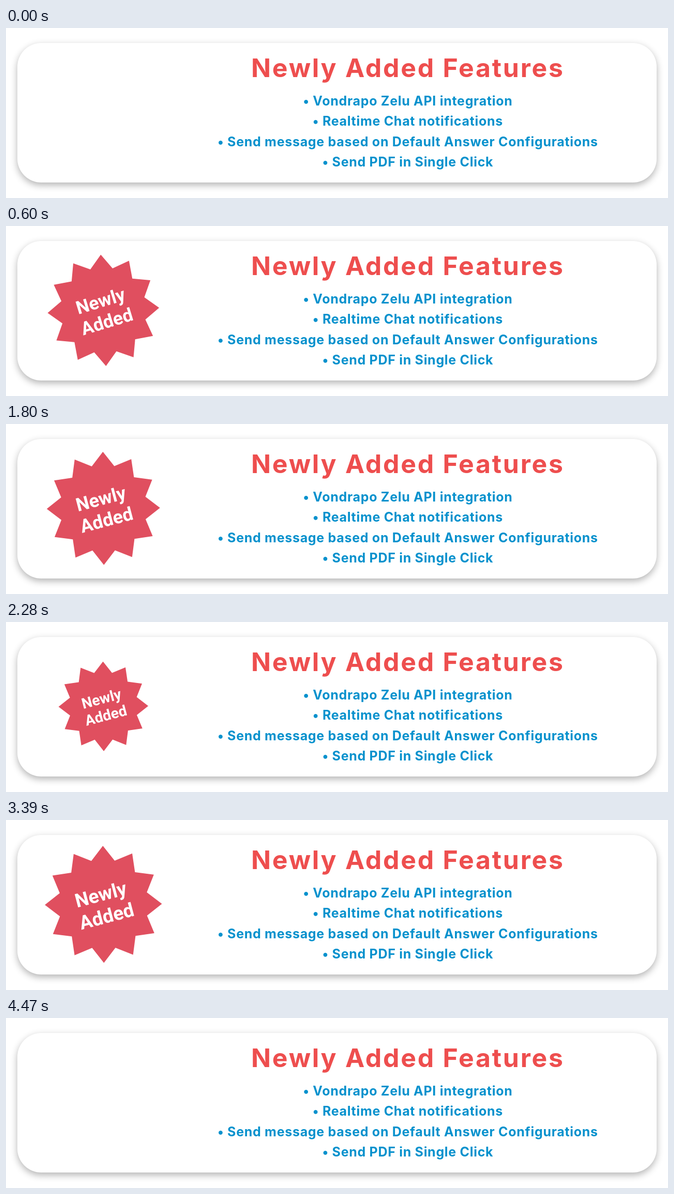
Animation of 1280 by 329 pixels, one loop 4500 ms. Source, as an HTML page with a canvas:

```html
<!DOCTYPE html>
<html lang="en">
<head>
<title>Newly Added Features</title>
<style>
  html, body { margin: 0; width: 100%; height: 100%; overflow: hidden; background: #fff; }
  canvas { display: block; width: 100vw; height: 100vh; }
</style>
</head>
<body>
<canvas id="stage" width="1280" height="329"></canvas>
<script>
const ctx = document.getElementById('stage').getContext('2d');
const LOOP = 4500, STEP = 30;
const TAU = Math.PI * 2, RAD = Math.PI / 180;
const CENTER = { x: 188.3, y: 163.2 };
const REST = 107, LOW = 86.5, HIGH = 113.8;
const PULSE = { start: 1165, half: 365 };
const EXIT = { start: 4040, end: 4470 };

const BULLETS = [
  'Vondrapo Zelu API integration',
  'Realtime Chat notifications',
  'Send message based on Default Answer Configurations',
  'Send PDF in Single Click'
];

const clamp = v => Math.min(1, Math.max(0, v));
const mix = (a, b, k) => a + (b - a) * k;
const easeSine = u => (1 - Math.cos(Math.PI * clamp(u))) / 2;

function easeBack(u, c = 1.25) {
  const v = clamp(u) - 1;
  return 1 + (c + 1) * v ** 3 + c * v * v;
}

// Radius before the exit: pop in, then breathe between LOW and HIGH.
function pulseRadius(t) {
  if (t < PULSE.start) return REST * easeBack(t / 660);
  const n = (t - PULSE.start) / PULSE.half;
  if (n < 1) return mix(REST, LOW, easeSine(n));
  return mix(LOW, HIGH, (1 + Math.cos(Math.PI * n)) / 2);
}

function badgePose(t) {
  const out = easeSine((t - EXIT.start) / (EXIT.end - EXIT.start));
  const turn = -0.5 - 34 * (1 - clamp(t / 1000)) ** 3;
  return {
    x: CENTER.x + 6 * out,
    y: CENTER.y + 1.5 * out,
    r: pulseRadius(t) * (1 - out),
    turn: turn * RAD
  };
}

function write(text, x, y, size, spacing, color) {
  ctx.font = `700 ${size}px Inter, "Open Sans", sans-serif`;
  ctx.letterSpacing = spacing + 'px';
  ctx.fillStyle = color;
  ctx.fillText(text, x + spacing / 2, y);
}

function drawCard() {
  ctx.fillStyle = '#fff';
  ctx.fillRect(0, 0, 1280, 329);
  ctx.save();
  ctx.shadowColor = 'rgba(0,0,0,.3)';
  ctx.shadowBlur = 14;
  ctx.shadowOffsetY = 5;
  ctx.beginPath();
  ctx.roundRect(22, 29, 1236, 270, 46);
  ctx.fill();
  ctx.restore();

  ctx.textAlign = 'center';
  write('Newly Added Features', 775.5, 95, 50, 2.7, '#ee4e4e');
  BULLETS.forEach((line, i) =>
    write('\u2022 ' + line, 776.5, 149.5 + i * 39.5, 25, 0.7, '#0591cd'));
}

function drawBadge({ x, y, r, turn }) {
  if (r < 0.3) return;
  ctx.save();
  ctx.translate(x, y);
  ctx.rotate(turn);
  ctx.scale(r / 100, r / 100);

  ctx.beginPath();
  for (let i = 0; i < 24; i++) {
    const a = i * TAU / 24, d = i % 2 ? 77 : 100;
    ctx.lineTo(d * Math.sin(a), -d * Math.cos(a));
  }
  ctx.closePath();
  ctx.fillStyle = '#e04f5f';
  ctx.fill();

  ctx.rotate(-14.3 * RAD);
  ctx.font = '700 32.8px Roboto, sans-serif';
  ctx.letterSpacing = '0px';
  ctx.fillStyle = '#fff';
  ctx.fillText('Newly', 0, -6);
  ctx.fillText('Added', 0, 32.5);
  ctx.restore();
}

const begin = performance.now();
function frame() {
  const t = (performance.now() - begin) % LOOP;
  drawCard();
  drawBadge(badgePose(Math.floor(t / STEP) * STEP));
  requestAnimationFrame(frame);
}
frame();
</script>
</body>
</html>
```
